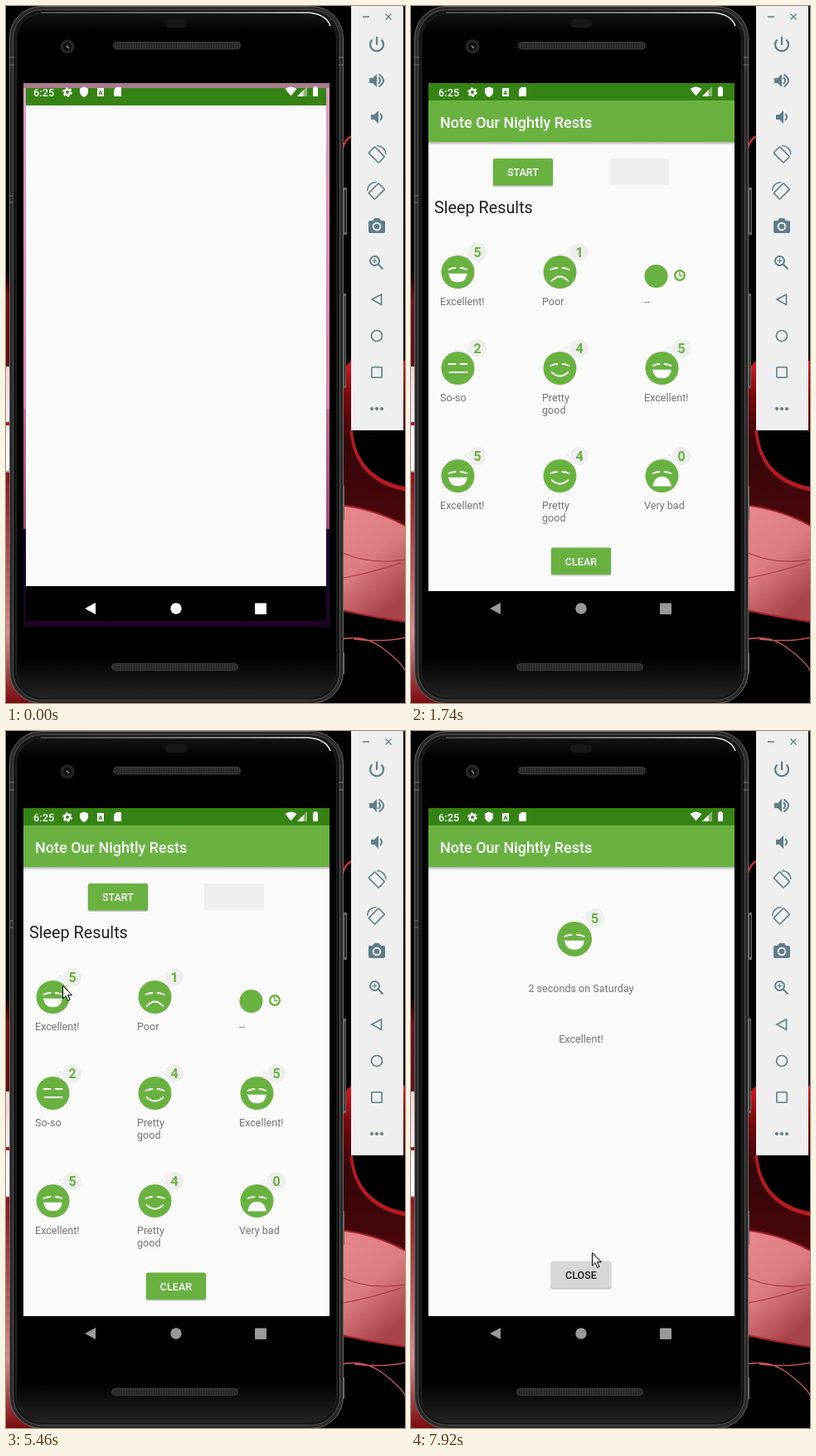
These frames come from a looping animation (481x841 px, 7.99 s). An HTML page:

```html
<!DOCTYPE html>
<html lang="en">
<head>
<meta charset="utf-8">
<title>Sleep log on a phone</title>
<style>
html, body { margin: 0; width: 100%; height: 100%; overflow: hidden; background: #000 }
svg { display: block; width: 481px; height: 841px }
text { font: 12.57px Roboto, sans-serif; fill: #757575 }
.medium { font-weight: 500 }
.mid { text-anchor: middle }
.line { fill: none; stroke: #fff; stroke-width: 1.8; stroke-linecap: round }
.tool { fill: none; stroke: #5f7d8c; stroke-width: 2 }
.solid { fill: #5f7d8c; stroke: none }
</style>
</head>
<body>
<svg viewBox="0 0 481 841">
  <defs>
    <linearGradient id="pink" x2=".5" y2="1">
      <stop stop-color="#e8888c"/><stop offset=".55" stop-color="#dc7c81"/><stop offset="1" stop-color="#a8434a"/>
    </linearGradient>
    <linearGradient id="red" x2="0" y2="1">
      <stop stop-color="#d81b22"/><stop offset=".2" stop-color="#7b0a0f"/><stop offset=".5" stop-color="#35050a"/><stop offset="1" stop-color="#4a070b"/>
    </linearGradient>
    <linearGradient id="edge" x2="0" y2="1">
      <stop offset=".38" stop-color="#000"/><stop offset=".42" stop-color="#6d1318"/><stop offset=".517" stop-color="#5d1015"/>
      <stop offset=".517" stop-color="#f3d6da"/><stop offset=".666" stop-color="#fff"/><stop offset=".67" stop-color="#8c1720"/>
      <stop offset=".8" stop-color="#b4535c"/><stop offset=".9" stop-color="#d98c92"/><stop offset="1" stop-color="#7a0c12"/>
    </linearGradient>
    <linearGradient id="home" x2="0" y2="1">
      <stop stop-color="#d9a0bb"/><stop offset=".598" stop-color="#d884a8"/><stop offset=".6" stop-color="#c2688f"/>
      <stop offset=".82" stop-color="#9d4a76"/><stop offset=".82" stop-color="#1c0230"/><stop offset="1" stop-color="#1e0424"/>
    </linearGradient>
    <linearGradient id="glass" x2="0" y2="1">
      <stop stop-color="#141414"/><stop offset=".03" stop-color="#000"/><stop offset=".94" stop-color="#000"/><stop offset="1" stop-color="#232323"/>
    </linearGradient>
    <linearGradient id="shine">
      <stop stop-color="#555"/><stop offset=".7" stop-color="#aaa"/><stop offset="1" stop-color="#eee"/>
    </linearGradient>
    <linearGradient id="shade" x2="0" y2="1">
      <stop stop-opacity=".3"/><stop offset="1" stop-opacity="0"/>
    </linearGradient>
    <pattern id="grille" width="3" height="3" patternUnits="userSpaceOnUse">
      <path fill="#303030" d="M0 0H3V3H0Z"/><path fill="#1c1c1c" d="M1 1H2V3H1Z"/>
    </pattern>
    <clipPath id="screen"><path d="M21 93H390V749H21Z"/></clipPath>
  </defs>

  <!-- Wallpaper -->
  <path d="M0 0H481V841H0Z"/>
  <path fill="url(#edge)" d="M0 0H40V841H0Z"/>
  <path fill="#a8161d" d="M0 502H5V506H0Z"/>
  <path fill="url(#red)" d="M400 446Q408 436 416 428H481V630H400Z"/>
  <path fill="none" stroke="#b81a22" stroke-width="5" d="M417 512C420 552 443 576 482 583"/>
  <path d="M418 512C421 550 443 573 482 580V512Z"/>
  <path fill="none" stroke="#e8313a" stroke-width="2" d="M405 176Q408 160 417 157"/>
  <path fill="url(#pink)" stroke="#a5232b" stroke-width="2" d="M400 602Q444 606 483 628V743Q445 738 400 728Z"/>
  <path fill="none" stroke="#a93038" d="M406 660Q440 675 481 668M407 690Q440 684 476 672"/>
  <path fill="none" stroke="#c4545b" stroke-width="1.5" d="M400 765Q430 757 453 774T482 803M420 764Q455 768 482 762"/>

  <!-- Phone -->
  <path fill="#686868" d="M404 219H411V276H404ZM404 347H410V461H404ZM404 579H408V620H404ZM404 780H408V806H404Z"/>
  <path fill="#222" d="M408 222H410V273H408ZM408 350H409V458H408Z"/>
  <rect x="4.500" y=".5" width="402" height="841" rx="38" fill="#2a2a2a" stroke="#686868"/>
  <rect x="8.500" y="4.500" width="394" height="833" rx="35" fill="#161616" stroke="#505050"/>
  <rect x="12.500" y="8.500" width="386" height="826" rx="32" fill="url(#glass)" stroke="#222"/>
  <path fill="none" stroke="url(#shine)" stroke-width="1.5" d="M42 8H365Q386 10 391 24"/>
  <path fill="none" stroke="#777" d="M4 62H10M4 71H10M401 62H407M401 71H407M4 229H9M4 237H9"/>
  <rect x="192" y="16" width="26" height="10" rx="4" fill="#171717"/>
  <rect x="129.500" y="43.500" width="153" height="8.500" rx="4" fill="url(#grille)" stroke="#3c3c3c"/>
  <rect x="127.500" y="793.500" width="152" height="8" rx="4" fill="url(#grille)" stroke="#3c3c3c"/>
  <circle cx="74" cy="49" r="8.500" fill="#262626"/><circle cx="74" cy="49" r="5" fill="#0b0e12"/>
  <path stroke="#999" stroke-width="1.500" d="M73 48l3 3"/>

  <!-- Emulator controls -->
  <path fill="#efefef" d="M416 0H479V512H416Z"/>
  <g class="tool">
    <path stroke-width="1.3" d="M430 13H438M457.500 9.500l7 7m0-7l-7 7"/>
    <path d="M441.500 40.500a8 8 0 1 0 11 0M447 37V47" stroke-width="2.200"/>
    <path class="solid" d="M438 87h4l5-5v16l-5-5h-4zM440 131h4l5-5v16l-5-5h-4z"/>
    <path d="M449 86q4 4 0 8M449.500 82.500q11 7.500 0 15M451 130q4 4 0 8"/>
    <g id="turn" stroke-width="1.700">
      <rect x="441.500" y="171" width="10.500" height="17" rx="1" transform="rotate(-45 446.750 179.500)"/>
      <path stroke-width="1.500" d="M447 168.500Q457 169 458 179"/>
    </g>
    <use href="#turn" transform="matrix(-1 0 0 1 893.500 44)"/>
    <path class="solid" d="M439 259h3l2-3h6l2 3h3q2 0 2 2v11q0 2-2 2h-16q-2 0-2-2v-11q0-2 2-2z"/>
    <circle cx="447" cy="266" r="4.300" stroke="#efefef"/>
    <circle cx="444.500" cy="307.500" r="5.500"/><path d="M448.500 311.500l6 6"/><path stroke-width="1.200" d="M441.500 307.500h6m-3-3v6"/>
    <path stroke-width="1.600" d="M441 354L452.500 348V360.500Z"/>
    <rect x="440.800" y="435.800" width="12.400" height="12.400" rx="1" stroke-width="1.600"/>
    <circle cx="447" cy="398" r="6.500" stroke-width="1.600"/>
    <g class="solid"><circle cx="441" cy="486" r="2"/><circle cx="447" cy="486" r="2"/><circle cx="453" cy="486" r="2"/></g>
  </g>

  <g clip-path="url(#screen)">
    <g id="opening">
      <path fill="url(#home)" d="M21 93H390V749H21Z"/><path fill="#a77b8d" d="M21 93H390V99H21Z"/>
      <path fill="#368315" d="M24 99H386V121H24Z"/><path fill="#fafafa" d="M24 120H386V700H24Z"/><path d="M24 700H386V742H24Z"/>
    </g>
    <g id="window">
      <path fill="#368315" d="M21 93H390V115H21Z"/><path fill="#fafafa" d="M21 114H390V706H21Z"/><path d="M21 706H390V749H21Z"/>
    </g>
    <g id="app">
      <path fill="#69b241" d="M21 114H390V164H21Z"/><path fill="url(#shade)" d="M21 164H390V168H21Z"/>
      <text class="medium" x="35" y="146.500" style="font-size:18px;fill:#fff">Note Our Nightly Rests</text>
    </g>
    <g id="tracker"></g>
    <g id="list">
      <text x="28" y="250" style="font-size:19.800px;fill:#212121">Sleep Results</text>
    </g>
    <g id="detail">
      <text class="mid" x="205" y="314.500">2 seconds on Saturday</text>
      <text class="mid" x="205" y="375.500">Excellent!</text>
    </g>
    <g fill="#fff">
      <text class="medium" x="33" y="108.500" style="font-size:12.800px;fill:#fff">6:25</text>
      <circle cx="74" cy="104" r="3.200" fill="none" stroke="#fff" stroke-width="2.500"/>
      <circle cx="74" cy="104" r="5" fill="none" stroke="#fff" stroke-width="1.600" stroke-dasharray="2.600"/>
      <path d="M94 97.500l5 2v4q0 4-5 6.500q-5-2.500-5-6.500v-4zM110 99h8v10h-8zM133 98h5q1 0 1 1v10h-9V101z"/>
      <text class="mid" x="114" y="107" style="font-size:8px;font-weight:700;fill:#368315">A</text>
      <path fill="#8bb678" d="M363 97v12h-12z"/>
      <path d="M336.500 100q7-5 14 0l-7 8.500zM358.500 101.500v7.500h-7.500z"/>
      <path d="M370 98.500h1.500v-1.500h3v1.500h1.500v10.500h-6z"/>
    </g>
    <g id="nav">
      <path d="M95 727L108 720V734Z"/><circle cx="205" cy="727" r="6.700"/><rect x="300" y="720.500" width="14" height="13.500" rx="1"/>
    </g>
  </g>
  <path id="cursor" fill="#fff" stroke="#000" d="M.5.5V16L4 12.600 6.500 18.500 9 17.400 6.500 11.700H11.500Z"/>
</svg>
<script>
const LOOP = 7990, GREEN = '#69b241';
const $ = id => document.getElementById(id);
const add = (id, markup) => $(id).insertAdjacentHTML('beforeend', markup);

const button = (x, y, label, fill = GREEN, color = '#fff') => `
  <rect x="${x - .5}" y="${y + 1}" width="73" height="33" rx="2" opacity=".22"/>
  <rect x="${x}" y="${y}" width="72" height="32.500" rx="2" fill="${fill}"/>
  <text class="medium mid" x="${x + 36}" y="${y + 21}" style="fill:${color}">${label}</text>`;

const SLANTED = 'M-11-3Q-7-5-3-5M3-5Q7-5 11-3', FLAT = 'M-11-5H-3M3-5H11';
const FACES = [
  [SLANTED, 'M-11 12Q-9 1 0 1T11 12Z', '#fff'],
  [SLANTED, 'M-10 11Q0 0 10 11'],
  [FLAT, 'M-10 5H11'],
  [FLAT, 'M-10 5Q0 9 10 5'],
  [SLANTED, 'M-10 5Q0 14 10 5'],
  [SLANTED, 'M-11 2H11Q10 12 0 12T-11 2Z', '#fff']
];

// A face centred at 0,0 with its score badge
function face(score) {
  const [eyes, mouth, fill = 'none'] = FACES[score];
  return `<g fill="#eee"><circle cx="23.500" cy="-24" r="11"/><circle cx="5" cy="-20" r="2.500"/>
      <circle cx="9" cy="-25" r="2"/><circle cx="12" cy="-21" r="1.500"/></g>
    <circle r="20" fill="${GREEN}"/><path class="line" d="${eyes}"/>
    <path class="line" d="${mouth}" style="fill:${fill};stroke-width:${fill === 'none' ? 1.8 : .5}"/>
    <text class="mid" x="23.500" y="-18.300" style="font-size:16px;font-weight:700;fill:${GREEN}">${score}</text>`;
}

const active = `<circle cx="-7" cy="5" r="14" fill="${GREEN}"/>
  <circle cx="21.500" cy="4" r="5.800" fill="none" stroke="${GREEN}" stroke-width="2.500"/>
  <path d="M21.500 0V4.500H25" fill="none" stroke="${GREEN}" stroke-width="1.500"/>`;

const LABELS = ['Very bad', 'Poor', 'So-so', 'OK', 'Pretty good', 'Excellent!'];
[5, 1, -1, 2, 4, 5, 5, 4, 0].forEach((score, i) => {
  const x = 56.5 + i % 3 * 123, y = [321, 437, 567][i / 3 | 0];
  const lines = score < 0 ? ['--'] : score === 4 ? LABELS[4].split(' ') : [LABELS[score]];
  add('list', `<g transform="translate(${x} ${y})">${score < 0 ? active : face(score)}
    ${lines.map((s, n) => `<text x="-21.500" y="${40.3 + n * 15}">${s}</text>`).join('')}</g>`);
});

add('tracker', button(99, 184, 'START') + button(169, 653.5, 'CLEAR') +
  '<path fill="#eef0f0" d="M239 184H311V216.500H239Z"/>');
add('detail', `<g transform="translate(197 251) scale(1.05)">${face(5)}</g>` +
  button(169, 639.5, 'CLOSE', '#d6d7d7', '#222'));

// Pointer path: time, x, y
const PATH = [
  [3210, 374, 820], [3290, 305, 772], [3360, 252, 739], [3670, 252, 739], [3740, 205, 685],
  [3920, 100, 555], [4000, 67, 522], [4310, 67, 522], [4380, 80, 478], [4530, 104, 401],
  [4760, 100, 355], [5150, 85, 313], [5380, 62, 301], [5530, 73, 313], [6150, 73, 313],
  [6390, 71, 315], [6470, 71, 320], [6600, 88, 365], [6760, 139, 457], [6840, 190, 503],
  [6920, 226, 526], [7230, 226, 526], [7460, 225, 560], [7920, 218, 629]
];

const clamp = v => Math.min(1, Math.max(0, v));
const ramp = (t, from, to) => clamp((t - from) / (to - from));
const show = (id, on) => $(id).style.display = on ? '' : 'none';

function pointer(t) {
  const i = PATH.findIndex(p => p[0] > t);
  if (i < 0) return PATH.at(-1).slice(1);
  const [a, b] = [PATH[i - 1], PATH[i]], k = ramp(t, a[0], b[0]);
  return [1, 2].map(n => Math.round(a[n] + (b[n] - a[n]) * k));
}

function draw(now) {
  const t = now % LOOP;
  show('opening', t < 110);
  show('window', t >= 110);
  const fade = t < 1350 ? 0 : .25 + .75 * ramp(t, 1350, 1580);
  $('app').style.opacity = $('tracker').style.opacity = fade;
  show('tracker', t < 5690);
  show('list', t >= 1740 && t < 5690);

  const grey = 255 - 63 * ramp(t, 230, 1040) - 39 * ramp(t, 1040, 1580);
  $('nav').setAttribute('fill', `rgb(${grey},${grey},${grey})`);

  const slide = Math.round(369 * (1 + Math.cos(Math.PI * ramp(t, 5722, 6433))) / 2);
  show('detail', t >= 5722);
  $('detail').setAttribute('transform', `translate(${slide} 0)`);

  show('cursor', t >= PATH[0][0]);
  if (t >= PATH[0][0]) $('cursor').setAttribute('transform', `translate(${pointer(t)})`);
  requestAnimationFrame(draw);
}
requestAnimationFrame(draw);
</script>
</body>
</html>
```
